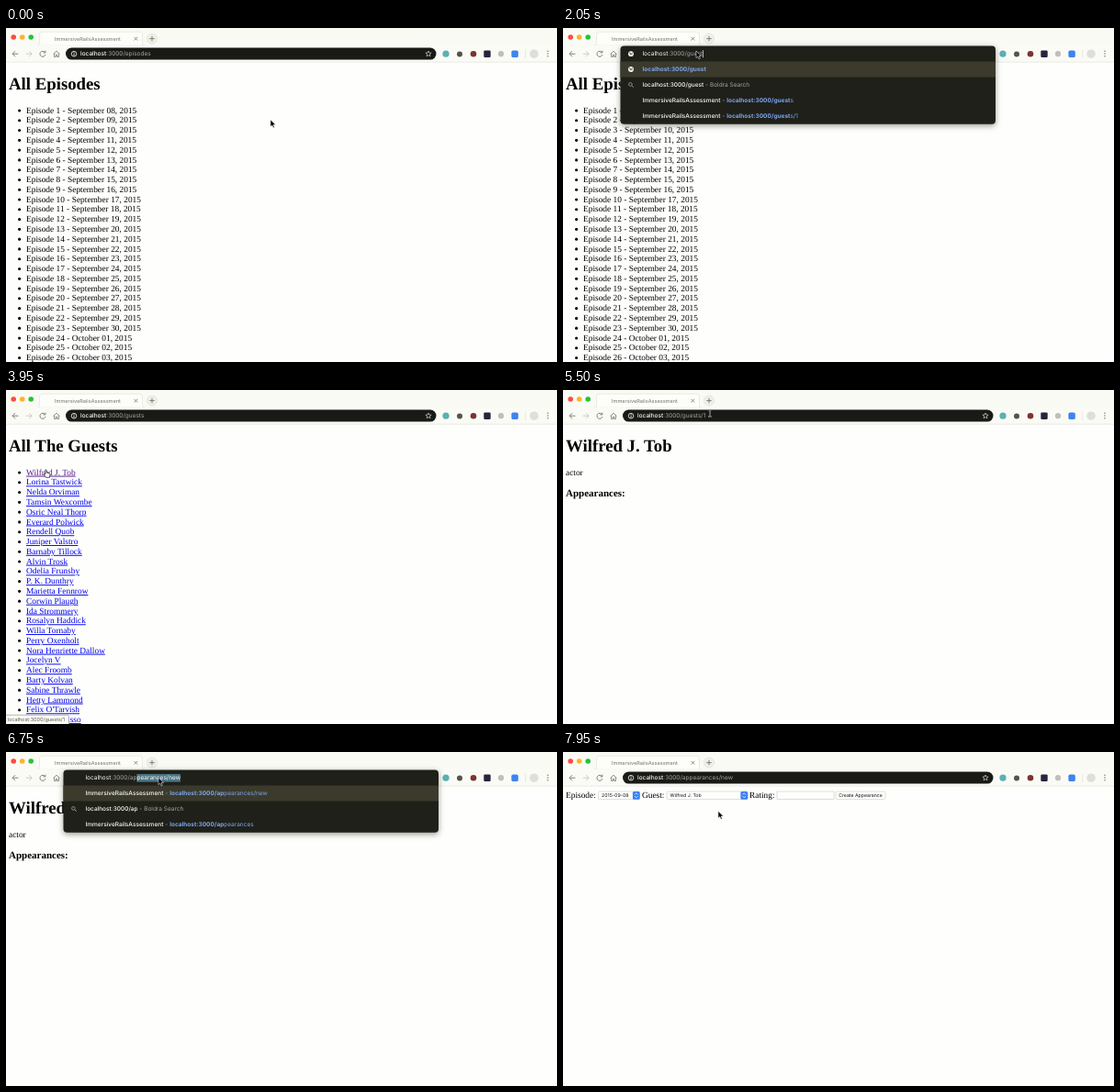
An HTML page that plays this animation: 600 px wide and 364 px high, repeating every 8 s.

```html
<!DOCTYPE html>
<html lang="en">
<head>
<meta charset="utf-8">
<title>Episodes and guests</title>
<style>
html, body { margin: 0; width: 100%; height: 100%; overflow: hidden; background: #fefefc; }
svg { display: block; width: 100vw; height: 100vh; }
text { white-space: pre; text-rendering: geometricPrecision; }
.serif { font-family: "Liberation Serif", serif; fill: #000; }
.ui { font-family: Inter, sans-serif; }
</style>
</head>
<body>
<svg id="stage" viewBox="0 0 600 364">
  <g id="page"></g>
  <g id="status"></g>
  <g id="chrome"></g>
  <g id="reload" fill="none" stroke="#74746a" stroke-width=".9"></g>
  <g id="omni"></g>
  <g id="cursor"></g>
</svg>
<script>
const LOOP = 8000;
const $ = id => document.getElementById(id);
const WHITE = "#fbfbf6", GREY = "#a5a59c", BLUE = "#7ba5ea";
const HOST = "localhost", BASE = ":3000/", TITLE = "ImmersiveRailsAssessment";
const URL_SIZE = 6.5;

const guests = ["Wilfred J. Tob", "Lorina Tastwick", "Nelda Orviman", "Tamsin Wexcombe",
  "Osric Neal Thorp", "Everard Polwick", "Rendell Quob", "Juniper Valstro", "Barnaby Tillock",
  "Alvin Trosk", "Odelia Frunsby", "P. K. Dunthry", "Marietta Fennrow", "Corwin Plaugh",
  "Ida Strommery", "Rosalyn Haddick", "Willa Tornaby", "Perry Oxenholt", "Nora Henriette Dallow",
  "Jocelyn V", "Alec Froomb", "Barty Kolvan", "Sabine Thrawle", "Hetty Lammond",
  "Felix O'Tarvish", "Henrietta Lusso"];

// --- drawing helpers ---
const rect = (x, y, w, h, fill, r = 0, more = "") =>
  `<rect x="${x}" y="${y}" width="${w}" height="${h}" rx="${r}" fill="${fill}" ${more}/>`;
const dot = (x, y, r, fill, more = "") => `<circle cx="${x}" cy="${y}" r="${r}" fill="${fill}" ${more}/>`;
const path = (d, stroke, w = .9, fill = "none") =>
  `<path d="${d}" stroke="${stroke}" stroke-width="${w}" fill="${fill}"/>`;
const serif = (x, y, s, size = 9.4, more = "") =>
  `<text class="serif" x="${x}" y="${y}" font-size="${size}" ${more}>${s}</text>`;
const ui = (x, y, s, size, fill, more = "") =>
  `<text class="ui" x="${x}" y="${y}" font-size="${size}" fill="${fill}" ${more}>${s}</text>`;
const span = (s, fill, weight = 400) => `<tspan fill="${fill}" font-weight="${weight}">${s}</tspan>`;

const pen = document.createElement("canvas").getContext("2d");
function textWidth(s) {
  pen.font = "65px Inter, sans-serif";
  return pen.measureText(s).width * URL_SIZE / 65;
}

const heading = s => serif(3, 66.5, s, 18.8, 'font-weight="bold"');
const globe = (x, y) => dot(x, y, 2.9, WHITE) +
  path(`M${x - 2} ${y - 1.2}l1.6 .4l.2 1.4l-1 .8M${x + 1.9} ${y - 1.3}l-1.3 1l.5 1.4`, "#33332a", .8);
const lens = (x, y) => dot(x - .6, y - .6, 1.8, "none", `stroke="${GREY}" stroke-width=".8"`) +
  path(`M${x + .8} ${y + .8}l1.9 1.9`, GREY);

// --- pages ---
const bullets = items => items.map((s, i) => {
  const y = 92.6 + i * 10.78;
  return dot(14.6, y - 2.6, 1.55, "#000") + s(y);
}).join("");

function episodesPage() {
  const rows = guests.map((_, i) => {
    const day = i + 8;
    const date = day <= 30 ? `September ${String(day).padStart(2, "0")}` : `October 0${day - 30}`;
    return y => serif(22, y, `Episode ${i + 1} - ${date}, 2015`);
  });
  return heading("All Episodes") + bullets(rows);
}

function guestsPage() {
  const rows = guests.map((name, i) => y =>
    serif(22, y, name, 9.4, `style="fill:${i ? "#0000ee" : "#551a8b"};text-decoration:underline"`));
  return heading("All The Guests") + bullets(rows);
}

const guestPage = () => heading(guests[0]) + serif(3, 92.6, "actor") +
  serif(3, 116, "Appearances:", 11, 'font-weight="bold"');

function formPage() {
  const box = (x, w, r = 1.5) => rect(x, 43, w, 8.6, "#fefefd", r, 'stroke="#c9c9c0" stroke-width=".6"');
  const select = (x, w, s) => box(x, w) + rect(x + w - 7.6, 42.9, 7.8, 8.8, "#3b82f0", 1.5) +
    path(`M${x + w - 5.3} 46.4l1.6 -1.6l1.6 1.6m0 1.8l-1.6 1.6l-1.6 -1.6`, "#fff", .8) +
    ui(x + 3.6, 49.3, s, 5.2, "#111");
  return serif(3, 50, "Episode:") + select(38.5, 45, "2015-09-08") +
    serif(86, 50, "Guest:") + select(113, 88, guests[0]) +
    serif(203, 50, "Rating:") + box(233, 62, 0) +
    box(297, 54) + ui(324, 49.3, "Create Appearance", 5.2, "#111", 'text-anchor="middle"');
}

const pages = { episodes: episodesPage, guests: guestsPage, guest: guestPage, form: formPage };

// --- browser frame ---
function frame() {
  const ink = "#74746a";
  const lights = ["#ff4b3e", "#ffb428", "#29c23a"].map((c, i) => dot(8.2 + i * 9.5, 10, 2.8, c)).join("");
  const dots = [25.2, 28, 30.8].map(y => dot(590, y, .75, ink)).join("");
  return rect(0, 0, 600, 19, "#fafaf5") +
    `<path d="M34 19.2q2.5 0 2.5 -2.5v-9.5q0 -3 3 -3h106q3 0 3 3v9.5q0 2.5 2.5 2.5z" fill="#fdfdf9" stroke="#dfdfd8" stroke-width=".6"/>` +
    rect(0, 19, 600, 18, "#fbfbf6") + rect(0, 36.8, 600, .6, "#dcdcd6") + lights +
    ui(53, 13.6, TITLE, 5.6, "#74746c") +
    path("M139.6 9.9l3.6 3.6m0 -3.6l-3.6 3.6", ink, .8) +
    dot(159, 11.6, 5.6, "#efefe8", 'stroke="#e0e0d8" stroke-width=".6"') +
    path("M156.3 11.6h5.4M159 8.9v5.4", ink) +
    path("M13.4 28.2H7.2M10 25.2l-3 3l3 3", ink) +
    path("M21.8 28.2H28M25.2 25.2l3 3l-3 3", "#c8c8c0") +
    path("M51.6 28.4l3.4 -3.2l3.4 3.2M52.6 27.8v3.7h1.7v-2.2h1.4v2.2h1.7v-3.7", ink, .8) +
    rect(65, 21.6, 403.5, 13, "#191916", 6.5) +
    path("M460 25l.9 2l2.2 .2l-1.7 1.4l.5 2.2l-1.9 -1.2l-1.9 1.2l.5 -2.2l-1.7 -1.4l2.2 -.2z", "#d5d5ce", .7) +
    dot(479, 28.2, 3.6, "#5bb0b4") + dot(494, 28.4, 3, "#55554e") + dot(509, 28.2, 3.3, "#7d3430") +
    rect(520.3, 24.6, 7.4, 7.4, "#25253c", 1.2) +
    dot(539, 28.2, 3.1, "#c0c0ba") + rect(550.4, 24.6, 7.4, 7.4, "#3f83ee", 1.6) +
    rect(565.5, 23.5, .6, 9.5, "#dcdcd6") + dot(575, 28.2, 4.8, "#dedfdc") + dots;
}

// --- address bar ---
const restPaths = { episodes: "episodes", guests: "guests", guest: "guests/1", form: "appearances/new" };

function inputText(x, typed, fill) {
  return ui(x, 30.4, span(HOST, WHITE) + span(BASE + typed, GREY) + span(fill, WHITE), URL_SIZE, GREY);
}
function selection(x, before, s) {
  return s ? rect(x + textWidth(HOST + BASE + before), 24, textWidth(s), 8.6, "#4d7484") : "";
}
const caret = (x, s) => rect(x + textWidth(HOST + BASE + s) + .3, 24.3, .7, 8, WHITE);

function restBar(url, selected, caretOn) {
  const cut = url.length - selected;
  const head = url.slice(0, cut), tail = url.slice(cut);
  return dot(74, 28.2, 2.8, "none", `stroke="${WHITE}" stroke-width=".8"`) +
    rect(73.6, 27.6, .9, 2.3, WHITE) + rect(73.6, 26.3, .9, .8, WHITE) +
    selection(81, head, tail) +
    ui(81, 30.4, span(HOST, WHITE, 500) + span(BASE + head, GREY) + span(tail, selected ? WHITE : GREY), URL_SIZE, GREY) +
    (caretOn ? caret(81, url) : "");
}

// rows: "=" is the typed address, "?" is a web search, anything else a visited path
function dropdown({ typed, fill, rows }) {
  const h = 17 + rows.length * 17;
  const lines = rows.map((row, i) => {
    const y = 45 + i * 17, base = y + 2.3;
    if (row === "=") return globe(74, y) + ui(86.5, base, HOST + BASE + typed, URL_SIZE, BLUE, 'font-weight="700"');
    if (row === "?") return lens(74, y) + ui(86.5, base,
      span(HOST + BASE + typed, WHITE, 500) + span(" - Boldra Search", GREY), URL_SIZE, GREY);
    return ui(86.5, base, span(TITLE, WHITE, 500) + span(" - ", GREY) +
      span(HOST + BASE + typed, BLUE, 700) + span(row.slice(typed.length), BLUE), URL_SIZE, BLUE);
  }).join("");
  return rect(62.5, 19.5, 408.5, h + .2, "#20201a", 4, 'style="filter:drop-shadow(0 2px 3px rgba(60,60,45,.5))"') +
    rect(62.5, 36.5, 408.5, 17, "#3b3a2c") +
    (fill ? "" : globe(74, 28.2)) + selection(86.5, typed, fill) + inputText(86.5, typed, fill) +
    (fill ? "" : caret(86.5, typed)) + lines;
}

const guestRows = ["guests", "guests/1"];
const many = stem => [2, 3, 4, 5].map(n => `${stem}/${n}`);
const typing = [
  [1600, { typed: "g", fill: "uests", rows: ["guests", "?", "guests/1", ...many("guests"), "guests/6"] }],
  [1730, { typed: "gu", fill: "ests", rows: ["guests", "?", "guests/1"] }],
  [1830, { typed: "gue", fill: "", rows: ["=", "?", ...guestRows] }],
  [1930, { typed: "gues", fill: "", rows: ["=", "?", ...guestRows] }],
  [2030, { typed: "guest", fill: "", rows: ["=", "?", ...guestRows] }],
  [2200, { typed: "guests", fill: "", rows: ["=", "?", ...guestRows] }],
  [2450, null],
  [6350, { typed: "a", fill: "ppearances/new",
    rows: ["appearances/new", "?", "appearances", "appearances/1", ...many("appearances")] }],
  [6600, { typed: "ap", fill: "pearances/new", rows: ["appearances/new", "?", "appearances"] }],
  [6950, { typed: "app", fill: "earances/new", rows: ["appearances/new", "?", "appearances"] }],
  [7200, null]
];

// --- timeline ---
const at = (list, t) => list.reduce((cur, [from, v]) => t >= from ? v : cur, null);
const pageTimes = [[0, "episodes"], [2650, "guests"], [4500, "guest"], [7350, "form"]];
const urlTimes = [[0, "episodes"], [2450, "guests"], [4400, "guest"], [7200, "form"]];
const shapeTimes = [[0, "arrow"], [950, "beam"], [1600, "arrow"], [3650, "hand"], [4500, "arrow"],
  [5350, "beam"], [6350, "arrow"]];
const moves = [[0, 288, 100], [250, 288, 100], [950, 160, 28], [1300, 145, 25], [2500, 145, 25],
  [2850, 169.5, 42], [3050, 169.5, 42], [3750, 43.5, 87], [4750, 43.5, 87], [5450, 160, 25],
  [5950, 157, 27], [6150, 121, 27], [6350, 121, 27], [6650, 166, 28], [7200, 166, 28],
  [7650, 169, 64.5], [LOOP, 169, 64.5]];
const notes = [
  { from: 2450, to: 3110, fade: 200, text: "Waiting for localhost...", w: 199 },
  { from: 3700, to: 4400, fade: 1, text: "localhost:3000/guests/1", w: 68.5 },
  { from: 4400, to: 4950, fade: 200, text: "Waiting for localhost...", w: 199 },
  { from: 7200, to: 7950, fade: 100, text: "Waiting for localhost...", w: 199 }
];

const beam = "M-1.5 -3.6q1.5 0 1.5 1v5.4q0 1 -1.5 1m3 0q-1.5 0 -1.5 -1v-5.4q0 -1 1.5 -1";
const shapes = {
  arrow: `<path d="M0 0v7.6l1.8 -1.6l1.2 2.8l1.3 -.6l-1.2 -2.7h2.5z" fill="#000" stroke="#fff" stroke-width=".5"/>`,
  beam: path(beam, "#fff", 1.6) + path(beam, "#222", .8),
  hand: `<path d="M-.7 .2q.7 -.8 1.3 0v2.7l3.3 .9q.8 .3 .6 1.4l-.7 3.1h-3.8l-2.5 -3.4q.1 -1 1.2 -.4l.6 .6z" fill="#fff" stroke="#111" stroke-width=".7"/>`
};

function cursorAt(t) {
  const i = Math.max(1, moves.findIndex(m => m[0] > t));
  const [t0, x0, y0] = moves[i - 1], [t1, x1, y1] = moves[i];
  const k = (t - t0) / (t1 - t0), e = k * k * (3 - 2 * k);
  return [x0 + (x1 - x0) * e, y0 + (y1 - y0) * e];
}

function statusAt(t) {
  const n = notes.find(n => t >= n.from && t < n.to);
  if (!n) return "";
  const alpha = Math.min(1, (n.to - t) / n.fade);
  return `<g opacity="${alpha.toFixed(2)}">` +
    rect(-2, 354.2, n.w + 2, 12, "#fbfbf6", 2, 'stroke="#a3a39a" stroke-width=".8"') +
    ui(1.6, 361.2, n.text, 5.5, "#5c5c54") + "</g>";
}

function barAt(t) {
  const open = at(typing, t);
  if (open) return dropdown(open);
  const url = restPaths[at(urlTimes, t)];
  if (t >= 1150 && t < 1600) return restBar(url, t < 1300 ? 0 : url.length, t < 1300);
  if (t >= 5900 && t < 6350) {
    const n = Math.round(url.length * Math.min(1, Math.max(0, (t - 5950) / 200)));
    return restBar(url, n, n === 0);
  }
  return restBar(url, 0, false);
}

const shown = {};
function put(id, markup) {
  if (shown[id] !== markup) $(id).innerHTML = shown[id] = markup;
}

let page;
function render(t) {
  const next = at(pageTimes, t);
  if (next !== page) put("page", pages[page = next]());
  put("status", statusAt(t));
  const loading = (t >= 2450 && t < 2850) || (t >= 4400 && t < 4750) || (t >= 7200 && t < 7750);
  put("reload", loading ? '<path d="M37.4 25.6l5.2 5.2m0 -5.2l-5.2 5.2"/>'
    : '<path d="M42.3 26.4a3 3 0 1 0 .6 2.6M42.9 24.7v2.2h-2.3"/>');
  put("omni", barAt(t));
  put("cursor", shapes[at(shapeTimes, t)]);
  const [x, y] = cursorAt(t);
  $("cursor").setAttribute("transform", `translate(${x.toFixed(2)} ${y.toFixed(2)})`);
}

put("chrome", frame());
const start = performance.now();
function tick() {
  render((performance.now() - start) % LOOP);
  requestAnimationFrame(tick);
}
tick();
</script>
</body>
</html>
```
